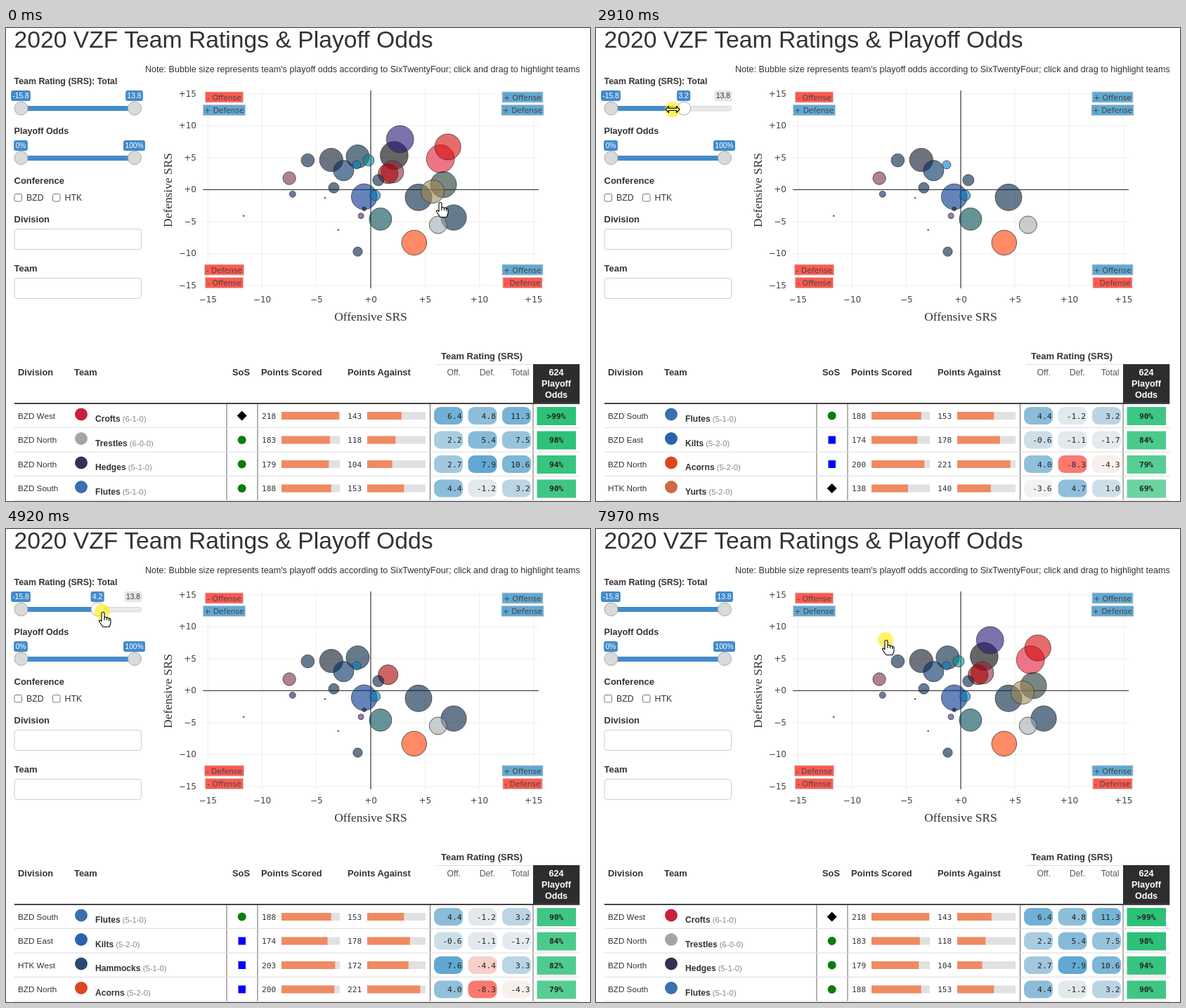
Recreate the animation shown at these times as an HTML page. Size 831x674 px, loop 8000 ms.

```html
<!DOCTYPE html>
<html lang="en">
<head>
<meta charset="utf-8">
<title>Team ratings</title>
<style>
html, body { margin: 0; width: 100%; height: 100%; overflow: hidden; background: #fff; }
svg { display: block; width: 100vw; height: 100vh; }
text { white-space: pre; }
.sans { font-family: "Liberation Sans", Arial, sans-serif; }
.bold { font-family: "Liberation Sans", Arial, sans-serif; font-weight: 700; }
.plot { font-family: "DejaVu Sans", Verdana, sans-serif; }
.mono { font-family: "DejaVu Sans Mono", monospace; }
.serif { font-family: "Liberation Serif", "Times New Roman", serif; }
</style>
</head>
<body>
<svg viewBox="0 0 831 674">
  <defs><clipPath id="edge"><rect width="816.5" height="674"/></clipPath></defs>
  <g id="page">
    <g id="fixed" clip-path="url(#edge)"></g>
    <g id="slider"></g>
    <g id="dots"></g>
    <g id="table"></g>
    <g id="tip"></g>
  </g>
  <g id="cursor">
    <circle id="halo" r="11" fill="#fdee21" fill-opacity=".7"/>
    <path id="shape" fill="#fff" stroke="#000" stroke-width="1.1" stroke-linejoin="round"/>
  </g>
</svg>
<script>
const LOOP = 8000;
const RED = [255, 90, 80], PALE = [247, 244, 241], BLUE = [98, 168, 209];
const WHITE = [255, 255, 255], GREEN = [42, 192, 118];
const NAVY = '#002244';

// offence, defence, playoff odds, colour, name, table details
const teams = [
  [6.42, 4.84, .99, '#E31837', 'Crofts', 'BZD West|6-1-0|diamond|#c8203a', 218, 143],
  [2.16, 5.36, .98, '#000000', 'Trestles', 'BZD North|6-0-0|circle|#a3a5a8', 183, 118],
  [2.7, 7.9, .94, '#241773', 'Hedges', 'BZD North|5-1-0|circle|#3a2c55', 179, 104],
  [4.4, -1.2, .90, NAVY, 'Flutes', 'BZD South|5-1-0|circle|#3b6fae', 188, 153],
  [7.1, 6.7, .86, '#D50A0A'],
  [6.7, .8, .86, '#203731'],
  [-.6, -1.1, .84, '#00338D', 'Kilts', 'BZD East|5-2-0|square|#2a63ad', 174, 178],
  [7.64, -4.36, .82, NAVY, 'Hammocks', 'HTK West|5-1-0|square|#2b4a70', 203, 172],
  [4, -8.3, .79, '#FF3C00', 'Acorns', 'BZD North|5-2-0|square|#dd4520', 200, 221],
  [-3.64, 4.66, .69, '#0B162A', 'Yurts', 'HTK North|5-2-0|diamond|#cf6a45', 138, 140],
  [-1.2, 5.2, .68, NAVY, 'Looms'],
  [5.7, -.3, .68, '#9F8958', 'Corals'],
  [2, 2.8, .64, '#97233F', 'Tulips'],
  [.9, -4.6, .64, '#004C54'],
  [-2.5, 3, .53, '#002C5F'],
  [1.6, 2.5, .5, '#AA0000'],
  [6.2, -5.5, .39, '#A5ACAF'],
  [-5.8, 4.6, .22, NAVY],
  [-7.5, 1.8, .21, '#773141', 'Lantern Crowd', 'HTK East|2-5-0|square|#efb02a', 133, 165],
  [-.2, 4.6, .16, '#008E97', 'Magpies'],
  [.7, 1.5, .16, NAVY],
  [-3.4, .3, .14, NAVY],
  [.4, -.9, .14, '#0076B6'],
  [-1.2, -9.7, .11, NAVY, 'Pebbles', 'HTK East|2-5-0|square|#123a6b', 176, 243],
  [-1.3, 3.9, .09, '#0080C6'],
  [-7.2, -.7, .05, '#0B2265', 'Ladles', 'HTK East|1-6-0|square|#23408f', 122, 174],
  [-.9, -4.1, .04, '#4F2683', 'Teapots', 'HTK North|1-5-0|diamond|#c79a6a', 155, 192],
  [-.6, -3, .02, '#03202F'],
  [-4.2, -1.3, .002, '#222222'],
  [-3, -6.3, .002, '#222222', 'Spools', 'BZD South|1-6-0|circle|#2f7f86', 125, 194],
  [-11.7, -4.1, .002, '#222222', 'Moths', 'BZD East|0-7-0|diamond|#2c6b4c', 85, 203]
].map(([off, def, odds, color, name, info, scored, against]) => ({
  off, def, odds, color, name, info, scored, against,
  total: Math.round((off + def) * 10) / 10
}));

// time, upper end of the rating slider
const drag = [[0, 13.8], [2450, 13.8], [2910, 3.2], [2990, 3.2], [3220, -4.5], [3450, -6.4],
  [3650, -9.1], [4060, -9.1], [4230, -4.8], [4300, -4.8], [4920, 4.2], [5000, 4.2], [5380, 13.8]];
// time, pointer x, pointer y
const path = [[0, 617, 248], [70, 617, 248], [250, 600, 238], [450, 556, 212], [700, 526, 192],
  [930, 513, 181], [1150, 513, 181], [1300, 470, 178], [1680, 285, 142], [1800, 260, 133],
  [2070, 184, 116], [2450, 184, 116], [2910, 109, 116], [2990, 109, 116], [3220, 80, 117],
  [3450, 68, 117], [3650, 64, 117], [4060, 64, 117], [4230, 90, 116], [4300, 90, 116],
  [4920, 137, 118], [5000, 137, 118], [5400, 198, 118], [5700, 198, 118], [6100, 223, 117],
  [6570, 225.5, 117], [6790, 237, 128], [7580, 412, 166], [7900, 412, 158], [8000, 412, 158]];
// time, value from then on
const hovers = [[0, ''], [150, 'Corals'], [380, 'Tulips'], [620, 'Magpies'], [930, 'Looms'], [1230, 'Yurts'], [1380, '']];
const kinds = [[0, 'hand'], [1700, 'arrow'], [2000, 'resize'], [3220, 'hand'], [5380, 'arrow'], [6790, 'hand']];
const shapes = {
  hand: 'M-1 2.5Q-1 .5 1 .5Q3 .5 3 2.500V8Q5 6.8 6.5 8.4Q8.5 7.6 9.6 9.4Q12 9 12 11.5V16L10 21.5H1L-4 14.5Q-5.5 12-3 11.8L-1 13.5ZM3 8v4M6.5 9v3M9.6 10v3',
  arrow: 'M0 0V14L3.3 11L5.6 16.3L8 15.3L5.8 10.2H10Z',
  resize: 'M-10 0L-5.5-4.5V-1.5H5.5V-4.5L10 0L5.5 4.5V1.5H-5.5V4.5Z'
};

const $ = id => document.getElementById(id);
const esc = s => String(s).replace(/&/g, '&amp;').replace(/</g, '&lt;').replace(/>/g, '&gt;');
const text = (x, y, s, size, font = 'sans', color = '#333', more = '') =>
  `<text x="${x}" y="${y}" class="${font}" font-size="${size}" fill="${color}" ${more}>${esc(s)}</text>`;
const rect = (x, y, w, h, fill, more = '') =>
  `<rect x="${x}" y="${y}" width="${w}" height="${h}" fill="${fill}" ${more}/>`;
const line = (x1, y1, x2, y2, color, w = 1) =>
  `<path d="M${x1} ${y1}L${x2} ${y2}" stroke="${color}" stroke-width="${w}"/>`;
const circle = (x, y, r, fill, more = '') =>
  `<circle cx="${x}" cy="${y}" r="${r}" fill="${fill}" ${more}/>`;
const MID = 'text-anchor="middle"', END = 'text-anchor="end"';

const px = v => 519 + v * 15.45;
const py = v => 230.4 - v * 9.1;
const knobX = v => 21.5 + (v + 15.8) * 5.456;
const mix = (a, b, k) => `rgb(${a.map((c, i) => Math.round(c + (b[i] - c) * k))})`;
const shade = (v, lo, hi) => {
  const k = (v - lo) / (hi - lo);
  return k < .4 ? mix(RED, PALE, k / .4) : mix(PALE, BLUE, (k - .4) / .6);
};
const percent = o => o >= .99 ? '>99%' : o < .01 ? '<1%' : Math.round(o * 100) + '%';

function at(keys, t) {
  let i = 1;
  while (i < keys.length - 1 && keys[i][0] < t) i++;
  const a = keys[i - 1], b = keys[i];
  const k = Math.min(1, Math.max(0, (t - a[0]) / (b[0] - a[0])));
  return a.slice(1).map((v, n) => v + (b[n + 1] - v) * k);
}
const held = (steps, t) => steps.filter(s => s[0] <= t).pop()[1];

function badge(x, y, s, fill = '#428bca', color = '#fff') {
  const w = 5 + [...s].reduce((n, c) => n + (c === '%' ? 9.2 : /[.-]/.test(c) ? 3 : 5.6), 0);
  return rect(x - w / 2, y, w, 15, fill, 'rx="3"') + text(x, y + 11.3, s, 10.2, 'sans', color, MID);
}
const knob = (x, y, fill = '#dadada') => circle(x, y, 9.5, fill, 'stroke="#aaa"');
const track = y => rect(12.5, y, 180, 6.5, '#e9e9e9', 'rx="3" stroke="#d6d6d6"');

function drawFixed() {
  let s = text(11.5, 28, '2020 VZF Team Ratings & Playoff Odds', 33.7);
  s += text(198, 63, "Note: Bubble size represents team's playoff odds according to SixTwentyFour; click and drag to highlight teams", 12.6);

  [['Team Rating (SRS): Total', 80, 12.4], ['Playoff Odds', 151, 12.6], ['Conference', 222, 13],
    ['Division', 277, 13], ['Team', 347, 13]].forEach(([label, y, size]) => s += text(11.5, y, label, size, 'bold'));
  s += track(182) + rect(21.5, 182, 162, 7, '#428bca') + knob(21.5, 185) + knob(183, 185);
  s += badge(21, 160, '0%') + badge(182.5, 160, '100%');
  [[12, 'BZD'], [66.5, 'HTK']].forEach(([x, label]) => {
    s += rect(x, 236.5, 10.5, 10.5, '#fff', 'rx="2" stroke="#777"') + text(x + 17, 246, label, 12.3);
  });
  [286.5, 356.5].forEach(y => s += rect(12, y, 180.5, 29, '#fff', 'rx="4" stroke="#ccc"'));

  for (let v = -15; v <= 15; v += 5) {
    const label = (v < 0 ? '−' : '+') + Math.abs(v);
    if (v) s += line(px(v), 89, px(v), 371, '#eee') + line(280, py(v), 758, py(v), '#eee');
    s += text(px(v), 391, label, 12, 'plot', '#444', MID) + text(271, py(v) + 4, label, 12, 'plot', '#444', END);
  }
  s += line(519, 89, 519, 371, '#444', 1.3) + line(280, 230.4, 758, 230.4, '#444', 1.3);
  s += text(519, 417, 'Offensive SRS', 17.4, 'serif', '#333', MID);
  s += text(0, 0, 'Defensive SRS', 17.4, 'serif', '#333', MID + ' transform="translate(236 231) rotate(-90)"');

  [[310.5, 91, '- Offense'], [310.5, 109.5, '+ Defense'], [310.5, 337, '- Defense'], [310.5, 355.5, '- Offense'],
    [735, 91, '+ Offense'], [735, 109.5, '+ Defense'], [735, 337, '+ Offense'], [735, 355.5, '- Defense']
  ].forEach(([x, y, label]) => {
    const plus = label[0] === '+', w = (plus ? 58 : 54) + (label[2] === 'D' ? 2 : 0);
    s += rect(x - w / 2, y, w, 15, plus ? '#62a8d1' : '#ff5a50', 'stroke="#ccc" stroke-width=".8"');
    s += text(x, y + 11.5, label, 10.7, 'plot', '#444', MID);
  });

  [['Division', 17], ['Team', 97], ['SoS', 322], ['Points Scored', 363], ['Points Against', 486]]
    .forEach(([label, x]) => s += text(x, 495, label, 12.9, 'bold'));
  s += text(619, 472, 'Team Rating (SRS)', 13, 'bold') + line(612, 479.5, 747, 479.5, '#ddd');
  [['Off.', 647], ['Def.', 696], ['Total', 744.5]].forEach(([label, x]) => s += text(x, 495, label, 12.2, 'sans', '#555', END));
  s += rect(750, 479, 66.5, 56, '#2d2d2d');
  ['624', 'Playoff', 'Odds'].forEach((w, i) => s += text(783, 495 + i * 16, w, 12.6, 'bold', '#fff', MID));
  s += line(12, 535, 816.5, 535, '#444', 2);
  $('fixed').innerHTML = s;
}

function drawSlider(v, active) {
  const x = knobX(v);
  let s = track(111.5) + rect(21.5, 111, x - 21.5, 7, '#428bca') + knob(21.5, 114.5);
  s += knob(x, 114.5, active ? '#fff' : '#dadada') + badge(21, 89, '-15.8');
  if (v < 9) s += badge(181, 89, '13.8', '#e5e5e5', '#333');
  $('slider').innerHTML = s + badge(x - .5, 89, v.toFixed(1));
}

function mark(kind, y) {
  if (kind === 'circle') return circle(335.7, y, 6, '#088008');
  if (kind === 'square') return rect(330.5, y - 5.5, 10.5, 11, '#00f');
  return `<path d="M335.7 ${y - 7}l7 7l-7 7l-7-7Z"/>`;
}

function row(team, i) {
  const y = 552.5 + i * 34.5;
  const [division, record, sos, logo] = team.info.split('|');
  let s = text(17, y + 4, division, 11.7) + circle(107, y - 2, 9, logo);
  s += `<text x="127" y="${y + 8.5}" class="bold" font-size="12.1" fill="#333">${team.name}` +
    `<tspan font-size="11.3" font-weight="400" fill="#888"> (${record})</tspan></text>`;
  s += mark(sos, y);
  [[364, team.scored, 218, 82], [486, team.against, 243, 83]].forEach(([x, n, max, w]) => {
    s += text(x, y + 4, n, 11.2, 'mono') + rect(x + 28, y - 5.5, 83, 11, '#e1e1e1');
    s += rect(x + 28, y - 5.5, n / max * w, 11, '#ef8a62');
  });
  [[609, team.off, -11.7, 7.6], [657.5, team.def, -9.7, 7.9], [706, team.total, -15.8, 13.8]].forEach(([x, n, lo, hi]) => {
    s += rect(x, y - 12.5, 41, 25, shade(n, lo, hi), 'rx="9"') + text(x + 39.5, y + 4.3, n.toFixed(1), 11.3, 'mono', '#222', END);
  });
  s += rect(755.5, y - 12.5, 55.5, 26, mix(WHITE, GREEN, team.odds));
  s += text(783, y + 4, percent(team.odds), 11.2, 'mono', '#222', MID + ' font-weight="700"');
  [314, 358, 603.5, 750].forEach(x => s += line(x, y - 17, x, y + 17, '#666'));
  return s + line(12, y + 17, 816.5, y + 17, '#ddd');
}

function drawData(v) {
  const shown = teams.filter(team => team.total <= v);
  $('dots').innerHTML = shown.map(team => circle(px(team.off), py(team.def), Math.max(.8, 20 * Math.sqrt(team.odds)),
    team.color, 'fill-opacity=".6" stroke="#333" stroke-opacity=".75"')).join('');
  $('table').innerHTML = shown.filter(team => team.info).slice(0, 4).map(row).join('');
}

function drawTip(name) {
  const team = teams.find(item => name && item.name === name);
  if (!team) return $('tip').innerHTML = '';
  const signed = n => (n < 0 ? '' : '+') + n.toFixed(1);
  const x = px(team.off) + 20 * Math.sqrt(team.odds), y = py(team.def);
  let s = `<path d="M${x} ${y}l5-5V${y - 47}h133.5v94H${x + 5}V${y + 5}Z" fill="${team.color}" stroke="#fff"/>`;
  [[team.name, 0], ['Playoff Odds: ' + percent(team.odds), 3.5], ['Offensive SRS: ' + signed(team.off), 3.5],
    ['Defensive SRS: ' + signed(team.def), 3.5]].forEach(([label, dx], i) => {
    s += text(x + 8 + dx, y - 32 + i * 18.3, label, 14.3, 'serif', '#fff', 'font-weight="700"');
  });
  $('tip').innerHTML = s;
}

let last = {};
function render(t) {
  const v = Math.round(at(drag, t)[0] * 10) / 10;
  const active = t >= 2450 && t < 5450;
  const hover = held(hovers, t);
  const [x, y] = at(path, t);
  if (v !== last.v || active !== last.active) drawSlider(v, active);
  if (v !== last.v) drawData(v);
  if (hover !== last.hover) drawTip(hover);
  // a short list needs no scrollbar, so the page recentres
  $('page').setAttribute('transform', `translate(${v < -2.5 ? 7 : 0} 0)`);
  $('cursor').setAttribute('transform', `translate(${x.toFixed(1)} ${y.toFixed(1)})`);
  $('halo').setAttribute('opacity', t >= 2300 ? 1 : 0);
  const kind = held(kinds, t);
  $('shape').setAttribute('d', shapes[kind]);
  $('shape').setAttribute('fill', kind === 'resize' ? '#fdf27a' : '#fff');
  last = { v, active, hover };
}

drawFixed();
const start = performance.now();
function tick() {
  render((performance.now() - start) % LOOP);
  requestAnimationFrame(tick);
}
tick();
</script>
</body>
</html>
```
